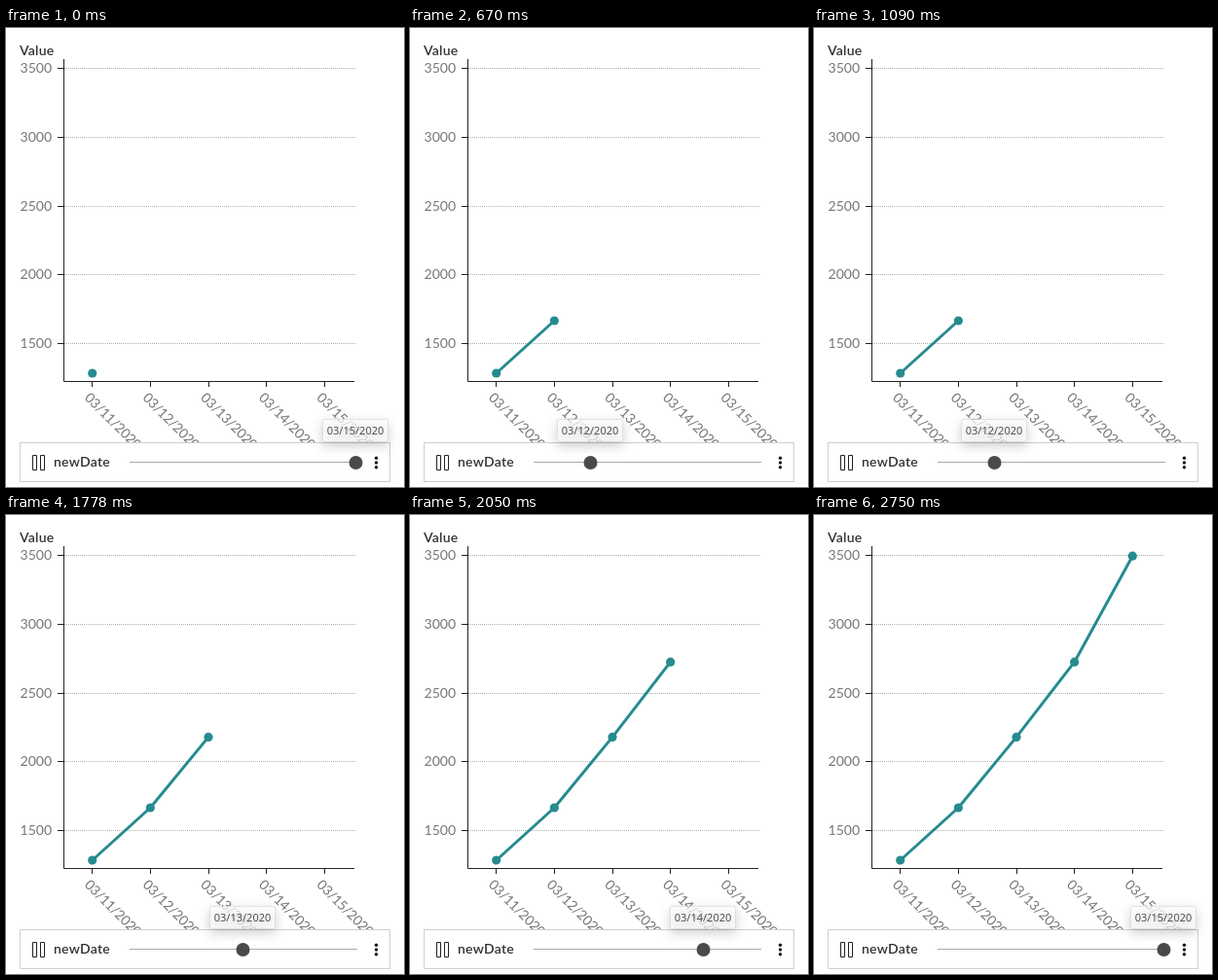
Recreate the animation shown at these times as an HTML page. Size 409 px wide and 472 px high, loop 3420 ms.

```html
<!DOCTYPE html>
<html lang="en">
<head>
<meta charset="utf-8">
<title>Animated line chart</title>
<style>
  html, body { margin: 0; width: 100%; height: 100%; overflow: hidden; background: #fff; }
  body { position: relative; }
  svg { display: block; }
  text { font: 14px Lato, sans-serif; fill: #767676; }
  .strong { font-weight: 600; fill: #323232; letter-spacing: .25px; }
  .date { letter-spacing: -.25px; }
  .axis { stroke: #222; fill: none; }
  .grid { stroke: #aaa; stroke-dasharray: 1 1; }
  .series { stroke: #268b8f; stroke-width: 3; fill: none; stroke-linejoin: round; }
  .marker { fill: #268b8f; }
  #tip {
    position: absolute; top: 402px; width: 68px; height: 24px; box-sizing: border-box;
    font: 500 11px/21px "Noto Sans", sans-serif; text-align: center; color: #505050;
    background: rgba(255, 255, 255, .72); border: 1px solid rgba(0, 0, 0, .1); border-radius: 3px;
    filter: drop-shadow(0 4px 6px rgba(0, 0, 0, .26));
  }
</style>
</head>
<body>
<svg width="409" height="472" viewBox="0 0 409 472">
  <text class="strong" x="14" y="28">Value</text>
  <g id="axes"></g>
  <path class="axis" d="M59.5 32V363.5H358"/>
  <polyline id="line" class="series"/>
  <g id="markers"></g>
  <rect x="14.5" y="426.5" width="380" height="40" fill="#fff" stroke="#cfcfcf"/>
  <path d="M27.5 439.5h4v15h-4zM35.5 439.5h4v15h-4z" fill="none" stroke="#222"/>
  <text class="strong" x="49" y="451">newDate</text>
  <path d="M127 446.5H361" stroke="#aaa"/>
  <circle id="knob" cy="447" r="7" fill="#4a4a4a"/>
  <g fill="#151515">
    <circle cx="380.5" cy="442.3" r="1.7"/>
    <circle cx="380.5" cy="447" r="1.7"/>
    <circle cx="380.5" cy="451.7" r="1.7"/>
  </g>
</svg>
<div id="tip"></div>
<script>
const $ = id => document.getElementById(id);
const LOOP = 3420;
// Each step: start time, number of plotted points, slider index
const steps = [[0, 1, 4], [340, 1, 0], [670, 2, 1], [1370, 3, 2], [2050, 4, 3], [2750, 5, 4]];
const dates = [11, 12, 13, 14, 15].map(day => `03/${day}/2020`);
const points = [355, 301, 228.4, 151.2, 42.2].map((y, i) => [88.7 + 59.65 * i, y]);

const yAxis = [41.5, 112.5, 183.5, 253.5, 324.5].map((y, i) => `
  <path class="grid" d="M60 ${y}H359"/>
  <path class="axis" d="M53 ${y}H59"/>
  <text x="47" y="${y + 4.5}" text-anchor="end">${3500 - 500 * i}</text>`);
const xAxis = points.map(([x], i) => `
  <path class="axis" d="M${Math.floor(x) + .5} 364v5"/>
  <text class="date" transform="translate(${x - 8.7} 381) rotate(45)">${dates[i]}</text>`);
$("axes").innerHTML = yAxis.concat(xAxis).join("");
$("markers").innerHTML = points.map(([x, y]) =>
  `<circle class="marker" cx="${x}" cy="${y}" r="4.6"/>`).join("");

function draw(now) {
  const time = now % LOOP;
  const [, count, index] = steps.findLast(([start]) => time >= start);
  const knobX = 127.5 + 58 * index;
  $("line").setAttribute("points", points.slice(0, count).join(" "));
  [...$("markers").children].forEach((dot, i) => dot.style.display = i < count ? "" : "none");
  $("knob").setAttribute("cx", knobX);
  $("tip").style.left = Math.round(knobX - 35) + "px";
  $("tip").textContent = dates[index];
  requestAnimationFrame(() => draw(performance.now()));
}
draw(performance.now());
</script>
</body>
</html>
```
